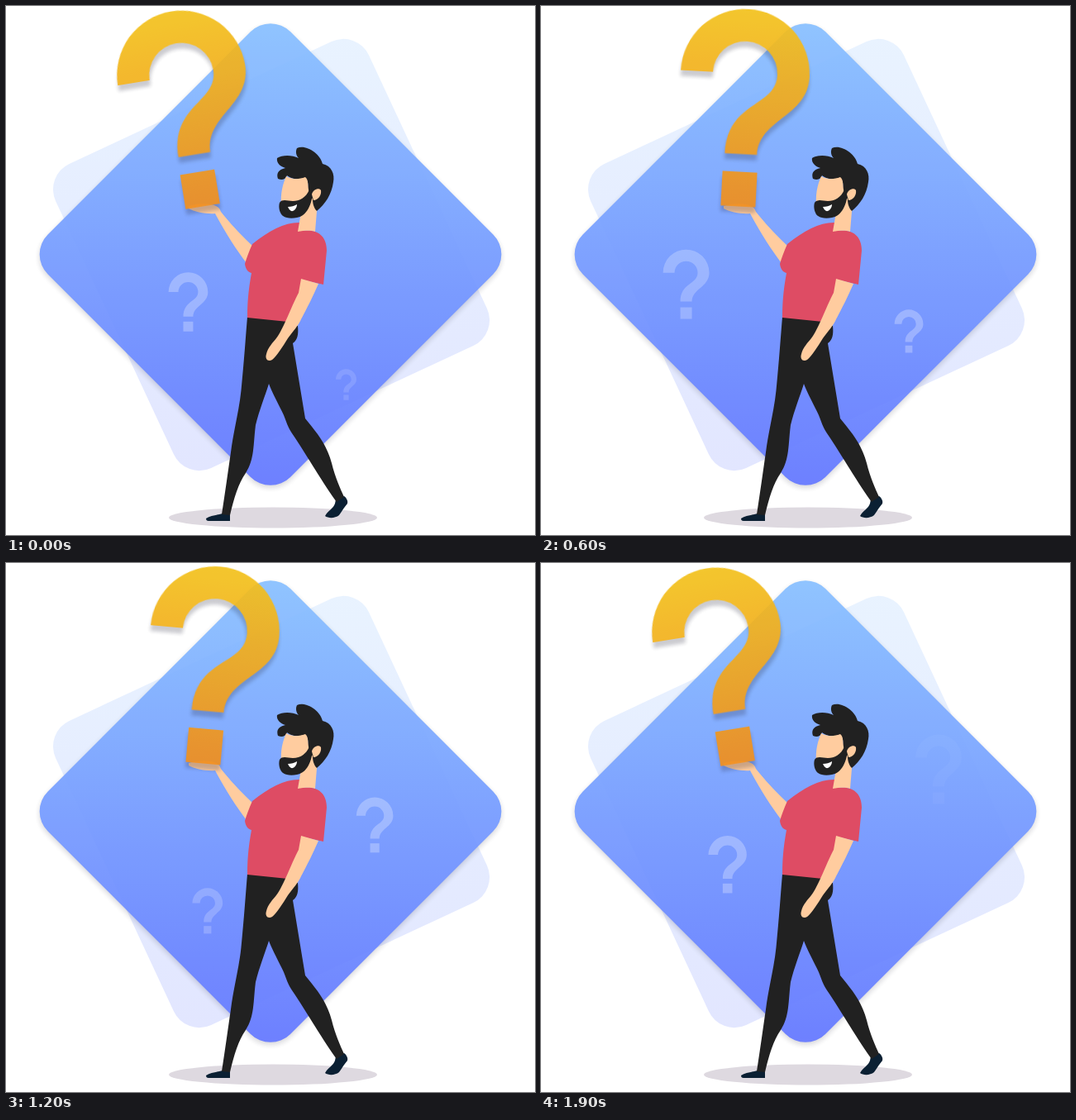
Recreate the animation shown at these times as an HTML page. Size 640 by 640 pixels, loop 2000 ms.

```html
<!DOCTYPE html>
<html lang="en">
<head>
<meta charset="utf-8">
<title>Man holding a question mark</title>
<style>
  html, body { margin: 0; width: 100%; height: 100%; overflow: hidden; background: #fff; }
  svg { display: block; width: 100%; height: 100%; }
  #diamond { filter: drop-shadow(0 3px 3px rgba(40, 40, 60, .2)); opacity: .94; }
  #mark { filter: drop-shadow(0 7px 2px rgba(30, 30, 50, .25)); opacity: .92; }
  .skin { fill: #ffcc9f; }
  .dark { fill: #212121; }
  .shirt { fill: #de4c64; }
  .shoe { fill: #0b2033; }
</style>
</head>
<body>
<svg viewBox="0 0 640 640">
  <defs>
    <linearGradient id="blue" gradientUnits="userSpaceOnUse" x1="320" y1="20" x2="320" y2="580">
      <stop offset="0" stop-color="#8ac1ff"/><stop offset="1" stop-color="#6579ff"/>
    </linearGradient>
    <!-- the same vertical fade, turned back for shapes that are rotated -->
    <linearGradient id="blue45" href="#blue" gradientTransform="rotate(-45 320 300)"/>
    <linearGradient id="blue25" href="#blue" gradientTransform="rotate(25 321 301)"/>
    <linearGradient id="gold" gradientUnits="userSpaceOnUse" x1="0" y1="-4" x2="0" y2="8.25">
      <stop offset="0" stop-color="#f3c21c"/><stop offset="1" stop-color="#f08e1e"/>
    </linearGradient>
    <!-- hook of the question mark, origin at the centre of its bowl -->
    <path id="hook" d="M-4 0A4 4 0 0 1 4 0C4 2.5 1 2.75 1 5H-1C-1 1.75 2 2 2 0A2 2 0 0 0-2 0Z"/>
    <g id="small"><use href="#hook"/><path d="M-1 6H1V8H-1Z"/></g>
  </defs>

  <rect x="112" y="98" width="418" height="406" rx="34" transform="rotate(-25 321 301)" fill="url(#blue25)" opacity=".19"/>
  <g id="diamond">
    <rect x="112.5" y="93" width="415" height="415" rx="34" transform="rotate(45 320 300.5)" fill="url(#blue45)"/>
  </g>

  <path id="leftTrack" fill="none" d="M247 437.5L240.5 403.5C234 367 214 339 174 336.5H148"/>
  <path id="rightTrack" fill="none" d="M411.5 458C432 446 445 425 445 394L446.5 291.5C446.5 268 458 257 481 249.5"/>
  <use id="leftMark" href="#small" fill="#fff"/>
  <use id="rightMark" href="#small" fill="#fff"/>

  <ellipse cx="323" cy="619" rx="126" ry="12.5" fill="#ded9e0"/>

  <g id="man">
    <path class="shoe" d="M242 620C248 616 256 616 262 614L271 615V623H245C243 623 242 622 242 620Z"/>
    <path class="shoe" d="M399 597L409 593C412 595 414 599 413 602C408 608 406 612 403 616C398 620 390 620 386 617C390 610 396 608 398 602Z"/>
    <path class="dark" d="M292 376L337 380L353 387C354 396 353 404 347 408L362 499C375 515 388 530 394 553C398 570 405 585 409 594L400 600C385 580 365 545 346 517C340 508 339 502 336 495C330 482 322 468 318 457C314 470 306 490 302 507C299 530 301 548 290 565C281 578 276 595 271 616L261 615C265 590 269 560 272 540C275 515 282 490 284.5 465C288 430 290 400 292 376Z"/>
    <path class="skin" d="M221 242C235 238 248 239 254 242C258 244 259 246 260 249C272 264 286 279 299 291L291 311C278 294 264 272 253 251C243 252 228 249 221 245Z"/>
    <path class="shirt" d="M357 262C338 261 319 271 298 288C294 297 291 305 289 312C290 319 293 322 297 323C293 345 292 360 292 377L341 382L362 345V332L384 337L388 296C388 279 378 269 357 272Z"/>
    <path class="skin" d="M357 250L366 222L377 236L374 273C368 271 360 272 353 273Z"/>
    <path class="skin" d="M357 330L378 336C372 350 364 366 357 379C354 386 347 394 341 402C335 412 327 424 322 428C317 431 313 427 315 421C317 413 323 407 327 402C335 392 345 364 354 347Z"/>
    <path class="dark" d="M352 172C362 167 380 178 383 191C394 193 398 204 396 213C394 228 386 240 376 248C372 244 371 238 371 234L365 222C366 214 365 210 361 208C352 211 343 208 340 205C338 210 334 211 329 209C327 203 329 198 338 196C331 194 327 189 328 184C334 180 346 180 354 184C351 181 350 176 352 172Z"/>
    <path class="skin" d="M339 206C346 210 354 210 362 207C366 210 365 216 366 222L368 232L352 247L333 240C332 226 335 215 339 206Z"/>
    <path class="dark" d="M331 238C334 233 341 236 347 236C355 236 363 232 367 222L371 226C370 240 364 254 352 256C343 258 334 256 332 250C330 246 330 241 331 238Z"/>
    <path fill="#fff" d="M341 243C345 243 349 242 352 240C352 245 348 249 345 248C343 247 342 245 341 243Z"/>
    <path class="skin" d="M370 228C371 222 379 219 381 223C382 228 378 235 372 235Z"/>
  </g>

  <g id="swing">
    <g id="mark">
      <g transform="translate(0 -162) scale(19.5)" fill="url(#gold)">
        <use href="#hook"/><rect x="-1.08" y="6.1" width="2.16" height="2.15"/>
      </g>
    </g>
  </g>
</svg>
<script>
  const byId = id => document.getElementById(id);
  const LOOP = 2000, STEP = 100, STEPS = LOOP / STEP;

  // A small mark follows its track at even speed, growing, fading in and out.
  function placeSmall(side, age, speed, startWidth, growth) {
    const point = byId(side + "Track").getPointAtLength(age * speed);
    const mark = byId(side + "Mark");
    const unit = (startWidth + growth * age) / 8;
    mark.setAttribute("transform", `translate(${point.x} ${point.y}) scale(${unit}) translate(0 -2)`);
    mark.setAttribute("opacity", Math.min(.13 + .035 * age, .27, .07 * (STEPS - .5 - age)));
  }

  function draw(time) {
    const step = Math.floor(time % LOOP / STEP);
    const angle = -9.25 + 2.055 * Math.min(step, STEPS - 1 - step);
    byId("swing").setAttribute("transform", `translate(238.3 243.5) rotate(${angle})`);
    placeSmall("right", step, 12.75, 25, 1.63);
    placeSmall("left", (step + STEPS / 2) % STEPS, 8.5, 34, 1.37);
  }

  const start = performance.now();
  function tick() {
    draw(performance.now() - start);
    requestAnimationFrame(tick);
  }
  tick();
</script>
</body>
</html>
```
